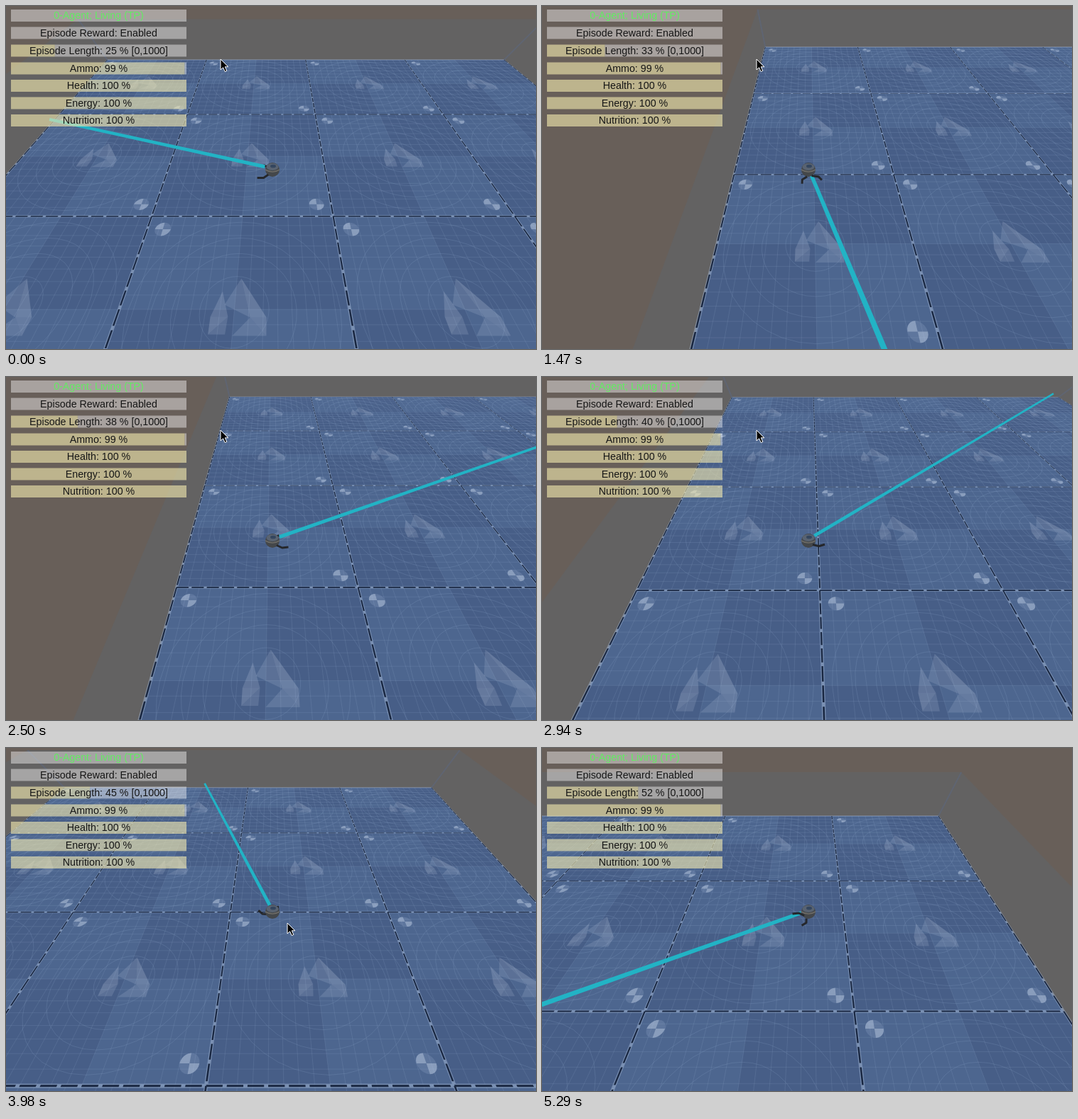
An HTML page that plays this animation: 746x484 px, repeating every 5390 ms.

```html
<!DOCTYPE html>
<html lang="en">
<head>
<meta charset="utf-8">
<title>Arena agent</title>
<style>
  html, body { margin: 0; width: 100%; height: 100%; overflow: hidden; background: #685f59; }
  svg { display: block; width: 746px; height: 484px; }
  text { font: 14.25px "Liberation Sans", Arial, sans-serif; text-anchor: middle; fill: #161616; }
</style>
</head>
<body>
<svg id="stage" viewBox="0 0 746 484"></svg>
<script>
const stage = document.getElementById('stage');

function add(tag, attrs, parent = stage) {
  const el = document.createElementNS('http://www.w3.org/2000/svg', tag);
  for (const key in attrs) el.setAttribute(key, attrs[key]);
  return parent.appendChild(el);
}
const layer = (fill, attrs) => add('path', { fill, ...attrs });
const lines = (opacity, width) =>
  layer('none', { stroke: '#a9c0e0', 'stroke-opacity': opacity, 'stroke-width': width });

// Timing: steps last 150 ms, a few 140 ms, the final one 100 ms.
const LOOP = 5390, LAST = 36;
const SHORT_STEPS = [3, 7, 9, 13, 16, 19, 21, 27, 30, 34, 35];
const starts = [0];
for (let i = 0; i < LAST; i++) starts.push(starts[i] + (SHORT_STEPS.includes(i) ? 140 : 150));

// step, tiles from left wall, depth offset of the back wall, heading in degrees
const KEYS = [
  [0, 1.665, 4.310, 162.2],
  [4, 1.178, 4.195, 230.6],
  [10, .466, 4.636, 286.3],
  [17, .528, 5.309, 387.3],
  [23, 1.484, 5.111, 416.8],
  [27, 2.267, 4.676, 469.8],
  [36, 2.781, 3.996, 566.9]
];

function slope(k, c) {
  const rate = j => (KEYS[j + 1][c] - KEYS[j][c]) / (KEYS[j + 1][0] - KEYS[j][0]);
  if (k === 0) return rate(0);
  if (k === KEYS.length - 1) return rate(k - 1);
  const before = KEYS[k][0] - KEYS[k - 1][0], after = KEYS[k + 1][0] - KEYS[k][0];
  return (rate(k - 1) * after + rate(k) * before) / (before + after);
}

function sample(step, c) {
  let k = 0;
  while (k < KEYS.length - 2 && step >= KEYS[k + 1][0]) k++;
  const h = KEYS[k + 1][0] - KEYS[k][0], s = (step - KEYS[k][0]) / h;
  const s2 = s * s, s3 = s2 * s;
  return (2 * s3 - 3 * s2 + 1) * KEYS[k][c] + (s3 - 2 * s2 + s) * h * slope(k, c)
    + (3 * s2 - 2 * s3) * KEYS[k + 1][c] + (s3 - s2) * h * slope(k + 1, c);
}

// Camera: tile sizes in perspective units and the two vanishing heights.
const TILE_X = .525, TILE_Z = .00091, HORIZON = -179, VANISH_Y = -190, CENTER = 375;
const AGENT_Q = 1 / 419, NEAR_Q = .0012, SIZE = 4;
let left = 0, backQ = 0;

function project(x, z) {
  const y = 1 / Math.max(NEAR_Q, backQ - z * TILE_Z) + HORIZON;
  return [CENTER + (left + x * TILE_X) * (y - VANISH_Y), y];
}
const pathOf = (points, close = 'Z') =>
  'M' + points.map(p => p[0].toFixed(1) + ' ' + p[1].toFixed(1)).join('L') + close;
const shape = (points, close) => pathOf(points.map(p => project(...p)), close);
const rect = (x0, z0, x1, z1) => shape([[x0, z0], [x1, z0], [x1, z1], [x0, z1]]);

function arc(x, z, r, from = 0, to = 360, n = 40) {
  const points = [];
  for (let i = 0; i <= n; i++) {
    const a = (from + (to - from) * i / n) * Math.PI / 180;
    points.push([x + r * Math.cos(a), z + r * Math.sin(a)]);
  }
  return points;
}

function eachTile(draw) {
  let d = '';
  for (let x = 0; x < SIZE; x++) for (let z = 0; z < SIZE; z++) d += draw(x, z);
  return d;
}

// Triangles in the middle of each tile, grouped by brightness.
const SHARDS = [
  [.13, [[.02, -.14, -.045, -.02, .07, .033], [-.025, .03, -.03, .1, -.1, .1], [.07, .033, .14, .105, 0, .105]]],
  [.2, [[.02, -.14, .07, .033, .14, .033], [-.1, .03, -.025, .03, -.1, .1]]],
  [.16, [[-.06, -.08, -.1, .03, -.025, .03], [.07, .033, .14, .033, .14, .105]]]
];

const wall = layer('#636262');
const corners = layer('none', { stroke: '#586a94', 'stroke-opacity': .3, 'stroke-width': 2 });
const floor = layer('#4d668f');
const shade = layer('#475e87');
const grid = lines(.13, 1);
const rings = lines(.15, 1);
const discs = layer('#a9bddb', { 'fill-opacity': .18 });
const pies = layer('#c3d2e8', { 'fill-opacity': .42 });
const shards = SHARDS.map(([opacity]) => layer('#dce6f5', { 'fill-opacity': opacity }));
const seamLight = layer('#a5bad8', { 'fill-opacity': .5 });
const seamDark = layer('#0f1c36', { 'fill-opacity': .9 });
const backLegs = layer('none', { stroke: '#25272b', 'stroke-width': 3, 'stroke-linejoin': 'round' });
const laser = layer('#22b3c5');

const body = add('g');
add('circle', { cx: 375, cy: 231, r: 10, fill: '#44474a' }, body);
add('ellipse', { cx: 375, cy: 227, rx: 8.5, ry: 5, fill: '#596371' }, body);
add('ellipse', { cx: 376, cy: 226, rx: 4, ry: 2.3, fill: '#34465f' }, body);
add('path', { d: 'M365 231q10 6 20 0', fill: 'none', stroke: '#6d6c67', 'stroke-width': 1.5 }, body);
const frontLegs = layer('none', { stroke: '#25272b', 'stroke-width': 3, 'stroke-linejoin': 'round' });

// Status panel
const BAR = { x: 7, width: 247 };
const ROWS = [
  ['0-Agent; Living (TP)', 5, 0],
  ['Episode Reward: Enabled', 29.5, 0],
  ['', 54.5, .25],
  ['Ammo: 99 %', 79.5, .99],
  ['Health: 100 %', 104, 1],
  ['Energy: 100 %', 128.5, 1],
  ['Nutrition: 100 %', 153, 1]
];
const bars = ROWS.map(([label, y, value], i) => {
  const fill = add('rect', { x: BAR.x, y, height: 17, fill: '#f7edb1', 'fill-opacity': .6 });
  const rest = add('rect', { y, height: 17, fill: '#fff', 'fill-opacity': .42 });
  const text = add('text', { x: 130.5, y: y + 13 });
  if (i === 0) text.style.fill = '#62ec62';
  const bar = { fill, rest, text };
  setBar(bar, label, value);
  return bar;
});

function setBar({ fill, rest, text }, label, value) {
  const w = BAR.width * value;
  fill.setAttribute('width', w);
  rest.setAttribute('x', BAR.x + w);
  rest.setAttribute('width', BAR.width - w);
  text.textContent = label;
}

const cursor = add('path', {
  d: 'M0 0V15L3.6 11.8L6.2 17.6L8.8 16.4L6.3 10.8H10.8Z',
  fill: '#000', stroke: '#fff', 'stroke-width': 1
});

const set = (el, d) => el.setAttribute('d', d);

function drawWalls() {
  const right = left + SIZE * TILE_X, top = .775 / backQ + HORIZON;
  const at = (a, y) => [CENTER + 1.5 * a * (y - VANISH_Y), y];
  set(wall, pathOf([at(left, top), at(right, top), at(right, 600), at(left, 600)]));
  set(corners, pathOf([project(0, 0), at(left, top)], '') + pathOf([project(SIZE, 0), at(right, top)], ''));
}

function drawFloor() {
  set(floor, rect(0, 0, SIZE, SIZE));
  set(shade, eachTile((x, z) => rect(x + .5, z, x + 1, z + .5) + rect(x, z + .5, x + .5, z + 1)));

  let d = '';
  for (let i = 0; i <= SIZE * 16; i++) {
    const p = i / 16;
    d += shape([[p, 0], [p, SIZE]], '') + shape([[0, p], [SIZE, p]], '');
  }
  set(grid, d);

  set(rings, eachTile((x, z) => [.15, .27, .36, .46].map(r => shape(arc(x + .5, z + .5, r))).join('')));

  const marks = (x, z) => [[x + .083, z + .085], [x + .917, z + .915]];
  set(discs, eachTile((x, z) => marks(x, z).map(m => shape(arc(...m, .042, 0, 360, 20))).join('')));
  set(pies, eachTile((x, z) => marks(x, z).map(m =>
    [0, 180].map(a => shape([m, ...arc(...m, .042, a, a + 90, 6)])).join('')).join('')));

  SHARDS.forEach(([, triangles], i) => set(shards[i], eachTile((x, z) => triangles.map(t =>
    shape([0, 2, 4].map(j => [x + .5 + t[j], z + .5 + t[j + 1]]))).join(''))));
}

function drawSeams() {
  const w = .0038;
  let dark = '', light = '';
  for (let n = 0; n <= SIZE; n++) {
    light += rect(n - 2 * w, 0, n + 2 * w, SIZE) + rect(0, n - 2 * w, SIZE, n + 2 * w);
    for (let s = 0; s < SIZE * 12; s++) {
      const a = s / 12, b = (s + .8) / 12;
      dark += rect(n - w, a, n + w, b);
      if (n) dark += rect(a, n - w, b, n + w);
    }
  }
  set(seamLight, light);
  set(seamDark, dark);
}

function drawAgent(x, z, degrees) {
  const angle = degrees * Math.PI / 180, c = Math.cos(angle), s = Math.sin(angle);

  // The beam runs until it meets a wall or leaves the view.
  const reach = Math.min(
    (c > 0 ? SIZE - x : x) / Math.abs(c),
    s > 0 ? z / s : Math.min((SIZE - z) / -s, (AGENT_Q - .0013) / (-s * TILE_Z)));
  const ends = [.05, reach].map(r => {
    const [px, py] = project(x + r * c, z - r * s), scale = py - HORIZON;
    return [px, py - .026 * scale, .006 * scale];
  });
  const [[x0, y0, w0], [x1, y1, w1]] = ends;
  const length = Math.hypot(x1 - x0, y1 - y0), nx = (y0 - y1) / length, ny = (x1 - x0) / length;
  set(laser, pathOf([
    [x0 + nx * w0, y0 + ny * w0], [x1 + nx * w1, y1 + ny * w1],
    [x1 - nx * w1, y1 - ny * w1], [x0 - nx * w0, y0 - ny * w0]
  ]));

  let front = '', back = '';
  for (const side of [-1, 1]) {
    const joint = (r, spread) => {
      const a = angle + side * spread;
      return [375 + r * Math.cos(a), 237 - r * .65 * Math.sin(a)];
    };
    const leg = pathOf([joint(6, .6), joint(15, .9), joint(23, .68)], '');
    if (Math.sin(angle + side * .7) < .3) front += leg; else back += leg;
  }
  set(frontLegs, front);
  set(backLegs, back);
}

function draw(step) {
  const u = sample(step, 1), v = sample(step, 2);
  left = -u * TILE_X;
  backQ = v * TILE_Z;
  drawWalls();
  drawFloor();
  drawSeams();
  drawAgent(u, v - AGENT_Q / TILE_Z, sample(step, 3));

  const percent = Math.floor(25.7 + .735 * step);
  setBar(bars[2], `Episode Length: ${percent} % [0,1000]`, percent / 100);

  const moved = Math.max(0, step - 24) / 3;
  cursor.setAttribute('transform', `translate(${302 + 94 * moved} ${75 + 172 * moved})`);
}

let shown = -1;
const begin = performance.now();
function tick() {
  const time = (performance.now() - begin) % LOOP;
  let step = LAST;
  while (starts[step] > time) step--;
  if (step !== shown) draw(shown = step);
  requestAnimationFrame(tick);
}
tick();
</script>
</body>
</html>
```
